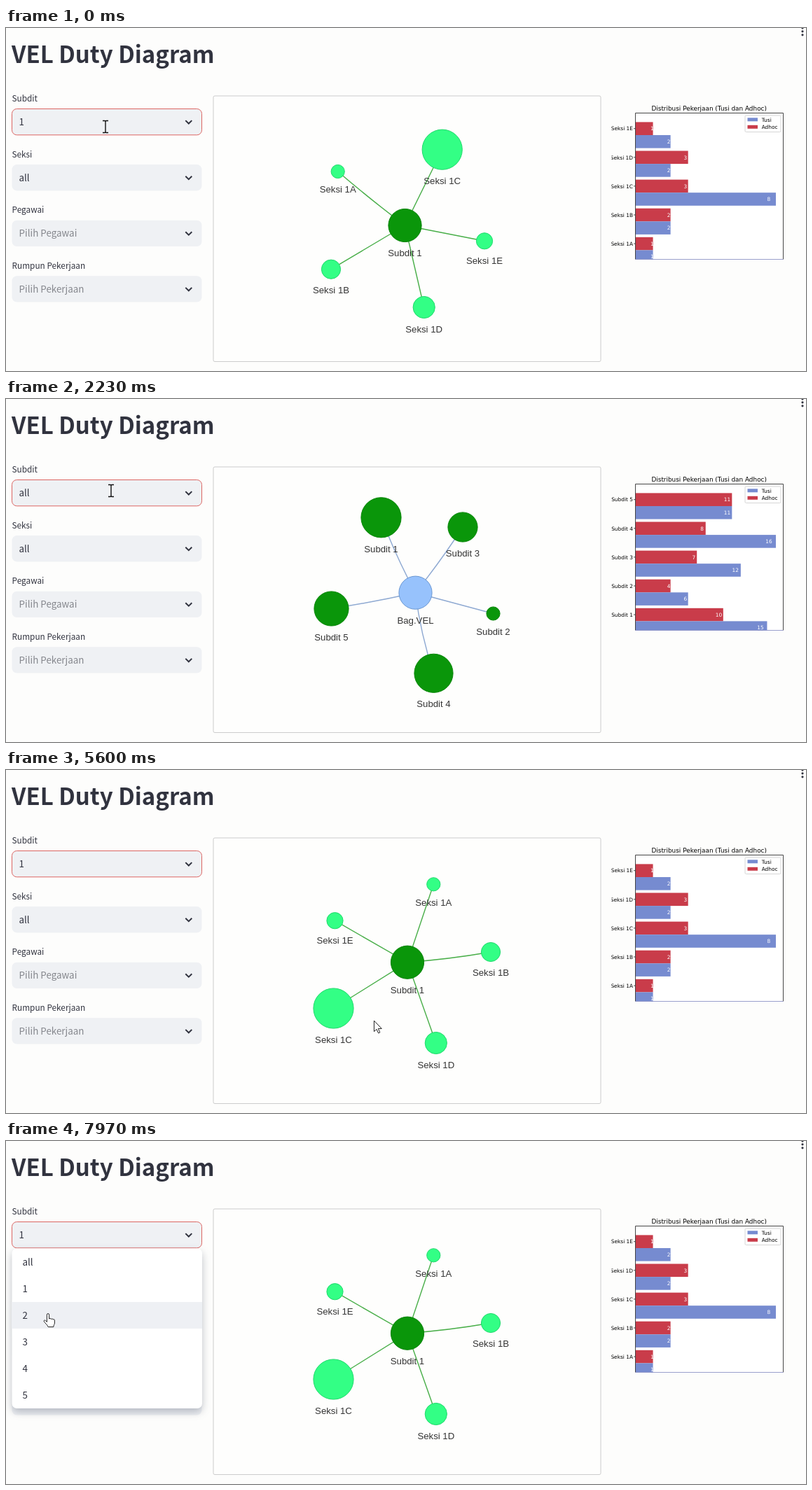
Animation, 1142 px wide and 490 px high, one loop 8 s. Source, as an HTML page:

```html
<!DOCTYPE html>
<html lang="id">
<head>
<meta charset="utf-8">
<title>VEL Duty Diagram</title>
<style>
html, body { margin: 0; width: 100%; height: 100%; overflow: hidden; background: #fdfdfc; }
svg { display: block; }
.ui { font-family: "Noto Sans CJK JP", "Noto Sans CJK SC", "Noto Sans CJK", Lato, sans-serif; fill: #31333f; }
.label { font-size: 11.8px; }
.value { font-size: 13.4px; }
.hint { fill: #85878d; }
.node { font: 13.2px "Liberation Sans", Arial, sans-serif; fill: #343434; text-anchor: middle; }
.plot { font: 7.42px "DejaVu Sans", sans-serif; }
.tip { font: 13.6px "DejaVu Sans", sans-serif; }
#menu { filter: drop-shadow(0 5px 6px rgba(60, 70, 90, .33)); }
#tip rect { filter: drop-shadow(3px 3px 4px rgba(0, 0, 0, .2)); }
</style>
</head>
<body>
<svg id="stage" width="1142" height="490" viewBox="0 0 1142 490"></svg>
<script>
const LOOP = 8000;
const stage = document.getElementById('stage');
const $ = id => document.getElementById(id);
const text = (cls, x, y, s, more = '') => `<text class="${cls}" x="${x}" y="${y}" ${more}>${s}</text>`;
const rect = (x, y, w, h, fill, more = '') => `<rect x="${x}" y="${y}" width="${w}" height="${h}" fill="${fill}" ${more}/>`;
const group = (id, body, more = '') => `<g id="${id}" ${more}>${body}</g>`;

// Sidebar
function field(name, value, i) {
  const y = 115.5 + 79.6 * i;
  return text('ui label', 8.5, y - 10.3, name)
    + rect(8.5, y, 271, 37.3, '#eff1f4', `rx="7" ${i ? '' : 'stroke="#dc6663"'}`)
    + text('ui value' + (i > 1 ? ' hint' : ''), 18.5, y + 23.6, value, i ? '' : 'id="value"')
    + `<path d="M256.3 ${y + 16.6}l4.5 4.4 4.5-4.4" fill="none" stroke="#31333f" stroke-width="2"/>`;
}

const sidebar = text('ui', 8, 50, 'VEL Duty Diagram', 'font-size="33" font-weight="700"')
  + ['Subdit,1', 'Seksi,all', 'Pegawai,Pilih Pegawai', 'Rumpun Pekerjaan,Pilih Pekerjaan']
    .map((s, i) => field(...s.split(','), i)).join('');

const options = ['all', 1, 2, 3, 4, 5];
const menu = rect(8.5, 153.5, 271.5, 228.5, '#fff', 'rx="7"')
  + options.map((s, i) => rect(8.5, 154 + 38 * i, 271.5, 38, '#eef0f4', `id="row${i}" opacity="0"`)
    + text('ui value', 23.5, 178 + 38 * i, s)).join('');

// Networks: each node is [name, x, y, radius, edge bend]
const THEMES = {
  seksi: { hub: '#0a960a', hubLine: '#078207', leaf: '#33ff85', leafLine: '#1fd96b', edge: '#48ae48' },
  subdit: { hub: '#97c2fc', hubLine: '#6a97d2', leaf: '#0a960a', leafLine: '#088608', edge: '#8ea9d2' }
};

function network(id, theme, [hub, ...leaves]) {
  const c = THEMES[theme];
  const [, hx, hy] = hub;
  const edge = ([, x, y, , bend]) => {
    const dx = x - hx, dy = y - hy, k = 2 * bend / Math.hypot(dx, dy);
    return `<path d="M${hx} ${hy}Q${hx + dx / 2 - dy * k} ${hy + dy / 2 + dx * k} ${x} ${y}" fill="none" stroke="${c.edge}" stroke-width="1.4"/>`;
  };
  const node = ([name, x, y, r], kind) =>
    `<circle cx="${x}" cy="${y}" r="${r - .4}" fill="${c[kind]}" stroke="${c[kind + 'Line']}"/>`
    + text('node', x, y + r + 20.3, name);
  return group(id, leaves.map(edge).join('') + node(hub, 'hub') + leaves.map(n => node(n, 'leaf')).join(''));
}

const networks = network('net0', 'seksi', [
  ['Subdit 1', 569.5, 282, 24],
  ['Seksi 1A', 473.7, 205, 10, -1], ['Seksi 1B', 464, 344.7, 14, 0], ['Seksi 1C', 622.7, 173.7, 29, 0],
  ['Seksi 1D', 596.7, 399, 16, 0], ['Seksi 1E', 683, 304.3, 12, 0]
]) + network('net1', 'subdit', [
  ['Bag.VEL', 584.5, 276.7, 24],
  ['Subdit 1', 535.5, 169.3, 29, -2], ['Subdit 2', 695.5, 306.5, 10, 0], ['Subdit 3', 652, 183, 21.5, 1.5],
  ['Subdit 4', 610.5, 391.8, 28, 3], ['Subdit 5', 464.5, 299.5, 25, -1]
]) + network('net2', 'seksi', [
  ['Subdit 1', 573, 274.7, 24],
  ['Seksi 1A', 610.3, 163.3, 10, 0], ['Seksi 1B', 692, 260, 14, 1.5], ['Seksi 1C', 467.5, 340.5, 29, 0],
  ['Seksi 1D', 613.8, 390, 16, 0], ['Seksi 1E', 469.5, 215.2, 12, 0]
]);

// Bar charts: each row is [name, adhoc, tusi], top to bottom
const RED = '#c93c4a', BLUE = '#768bd0';

function bar(value, unit, y, fill) {
  const w = value * unit;
  return rect(898.5, y, w, 18.6, fill)
    + text('plot', 898.5 + w * .95, y + 12, value, 'fill="#fff" text-anchor="middle"');
}

function chart(id, unit, rows) {
  return group(id, rows.map(([name, adhoc, tusi], i) => {
    const y = 134.4 + 41.1 * i;
    return text('plot', 895, y + 12, name, 'text-anchor="end"')
      + `<path d="M896 ${y + 9.3}h2.5" stroke="#222" stroke-width=".8"/>`
      + bar(adhoc, unit, y, RED) + bar(tusi, unit, y + 18.6, BLUE);
  }).join(''), 'clip-path="url(#plotClip)"');
}

const legend = rect(1055, 125, 51, 23.5, '#fff', 'rx="1.5" stroke="#ccc" stroke-width=".8"')
  + [['Tusi', BLUE], ['Adhoc', RED]].map(([s, c], i) =>
    rect(1058.5, 128.3 + 10.5 * i, 14.5, 5, c) + text('plot', 1078.7, 133.6 + 10.5 * i, s)).join('');

const charts = '<clipPath id="plotClip"><path d="M864.3 110h260v220.5h-260z"/></clipPath>'
  + rect(898.5, 121.5, 211, 209, '#fff')
  + chart('bars0', 25.06, [['Seksi 1E', 1, 2], ['Seksi 1D', 3, 2], ['Seksi 1C', 3, 8], ['Seksi 1B', 2, 2], ['Seksi 1A', 1, 1]])
  + chart('bars1', 12.53, [['Subdit 5', 11, 11], ['Subdit 4', 8, 16], ['Subdit 3', 7, 12], ['Subdit 2', 4, 6], ['Subdit 1', 10, 15]])
  + '<path d="M898.5 330.5v-209h211v209" fill="none" stroke="#333" stroke-width=".9"/>'
  + '<path d="M898.5 330.5h211" stroke="#8f95c8" stroke-width=".9"/>'
  + text('plot', 1003.7, 118, 'Distribusi Pekerjaan (Tusi dan Adhoc)', 'text-anchor="middle" style="font-size:8.9px"')
  + legend;

const tooltip = rect(629.5, 288.5, 70.5, 89, '#f5f4ed', 'rx="3" stroke="#808074"')
  + [['Seksi 1D', 308], ['Tusi: 2', 348], ['Adhoc: 3', 368]].map(([s, y]) => text('tip', 634.5, y, s)).join('');

const pointers = group('arrow', '<path d="M0 0V15.5L3.6 12.2 6.2 17.8 8.4 16.8 5.9 11.3H10.8Z" fill="#fff" stroke="#222"/>')
  + group('hand', '<path d="M-1.6 11.5V1.2a1.6 1.6 0 0 1 3.2 0V7.2a1.5 1.5 0 0 1 2.8.4a1.5 1.5 0 0 1 2.7.6a1.3 1.3 0 0 1 2.3.9V13c0 2-1.6 3-1.6 5.6H.2C-.5 16-5 12.5-5.8 10.6c-.5-1.6 1.4-2.2 2.4-.9Z" fill="#fff" stroke="#222"/>')
  + group('beam', '<path d="M-4-8.5H-1Q0-8.5 0-7V7Q0 8.5-1 8.5H-4M4-8.5H1Q0-8.5 0-7M0 7Q0 8.5 1 8.5H4" fill="none" stroke="#111" stroke-width="1.4"/>');

stage.innerHTML = sidebar
  + [0, 4.8, 9.8].map(y => `<circle cx="1137" cy="${y}" r="1.6" fill="#31333f"/>`).join('')
  + rect(296, 97, 553, 379.5, '#fefefd', 'rx="2" stroke="#ccc"')
  + networks + charts
  + group('menu', menu) + '<path id="caret" stroke="#31333f"/>'
  + group('tip', tooltip) + pointers;

// Timeline
const OPEN = [[250, 750], [2800, 3650], [7350, LOOP]];
const HOVER = [[0, 1], [430, 0], [3120, 1], [7700, 2]];
const PATH = [
  [0, 142, 141], [250, 142, 141], [530, 142, 155], [700, 142, 172], [1000, 144, 172], [1500, 150, 131],
  [2750, 150, 131], [3200, 146, 200], [3430, 144, 211], [3700, 144, 211], [4530, 334.5, 313], [5000, 334.5, 313],
  [6000, 628.5, 382.5], [6650, 628.5, 382.5], [7200, 140, 136], [7400, 140, 136], [7750, 62, 238], [7970, 60, 247], [LOOP, 60, 247]
];

const show = (id, on) => $(id).setAttribute('visibility', on ? 'visible' : 'hidden');

function pointerAt(t) {
  const i = PATH.findIndex(k => k[0] > t);
  const [t0, x0, y0] = PATH[i - 1], [t1, x1, y1] = PATH[i];
  const p = (t - t0) / (t1 - t0), e = p * p * (3 - 2 * p);
  return [x0 + (x1 - x0) * e, y0 + (y1 - y0) * e];
}

function pointerKind(x, y, open) {
  if (x < 8 || x > 280) return 'arrow';
  if (open && y > 153) return y < 382 ? 'hand' : 'arrow';
  const inField = [0, 1, 2, 3].some(i => Math.abs(y - 134 - 79.6 * i) < 19);
  return inField ? 'beam' : 'arrow';
}

function draw(t) {
  const open = OPEN.find(([a, b]) => t >= a && t < b);
  const value = t >= 750 && t < 3650 ? 'all' : '1';
  $('value').textContent = value;
  show('menu', open);
  show('caret', open && (t - open[0]) % 1000 < 500);
  $('caret').setAttribute('d', `M${value === 'all' ? 35.5 : 28.5} 125.5v18`);

  const h = HOVER.findLastIndex(k => k[0] <= t);
  const fade = h ? Math.min(1, (t - HOVER[h][0]) / 200) : 1;
  options.forEach((_, i) => {
    const opacity = i === HOVER[h][1] ? fade : h && i === HOVER[h - 1][1] ? 1 - fade : 0;
    $('row' + i).setAttribute('opacity', opacity);
  });

  show('net0', t < 1000);
  show('net1', t >= 1150 && t < 3950);
  show('net2', t >= 4150);
  const all = t >= 1000 && t < 3950;
  show('bars0', !all);
  show('bars1', all);
  show('tip', t >= 6150 && t < 6750);

  const [x, y] = pointerAt(t), kind = pointerKind(x, y, open);
  for (const id of ['arrow', 'hand', 'beam']) {
    show(id, id === kind);
    $(id).setAttribute('transform', `translate(${x} ${y})`);
  }
}

const start = performance.now();
function tick() {
  draw((performance.now() - start) % LOOP);
  requestAnimationFrame(tick);
}
tick();
</script>
</body>
</html>
```
